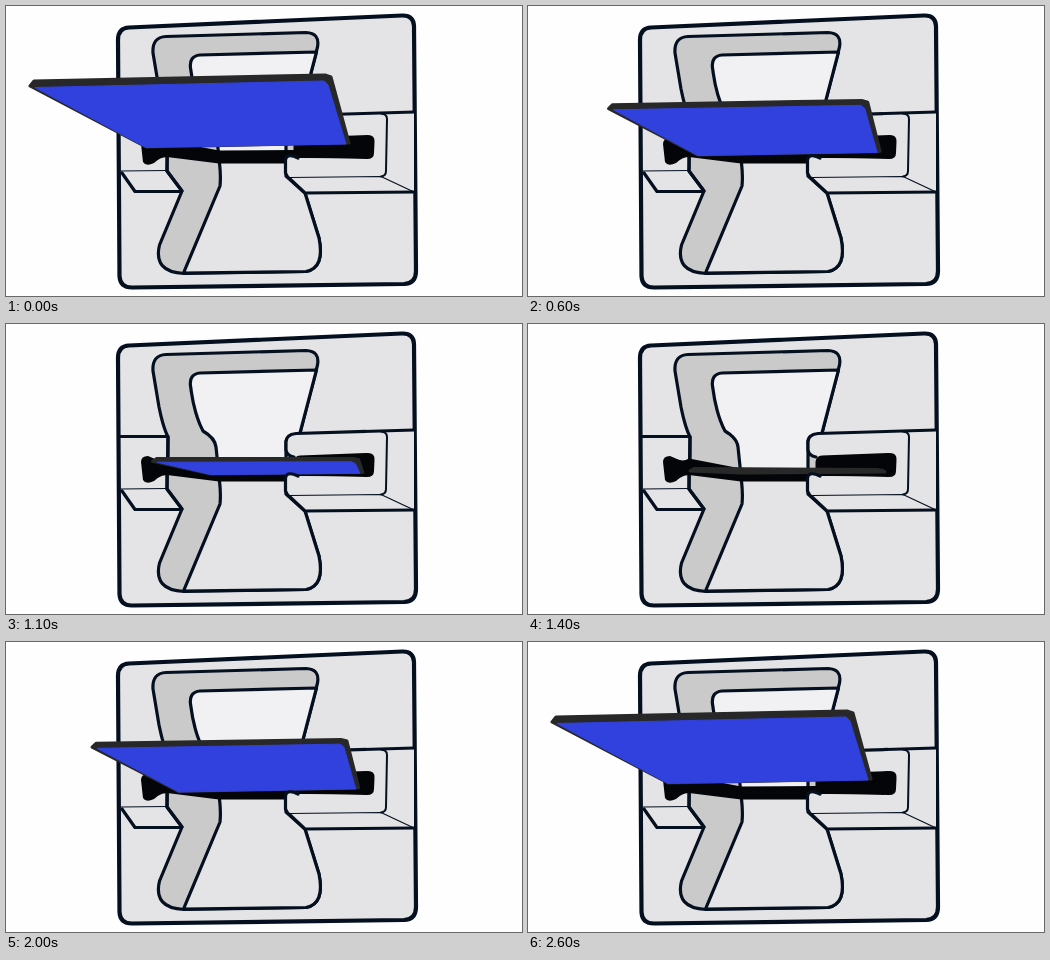
An HTML page for the animation above (2.7 s loop, 516 by 290 pixels).

```html
<!DOCTYPE html>
<html lang="en">
<head>
<meta charset="utf-8">
<title>Folding panel</title>
<style>
  html, body { margin: 0; width: 100%; height: 100%; overflow: hidden; background: #fefdff; }
  svg { display: block; width: 516px; height: 290px; }
  .line { fill: none; stroke: #04101f; stroke-width: 3.2; stroke-linejoin: round; stroke-linecap: round; }
  .frame { stroke-width: 4.2; }
  .edge { stroke-width: 2; }
  .thin { stroke-width: 1.2; }
  .body { fill: #e4e3e5; }
  .wall { fill: #cbcacb; }
  .view { fill: url(#view); }
  .slot { fill: #030509; }
  #rim { fill: #282829; stroke: #282829; stroke-width: 3; stroke-linejoin: round; }
  #face { fill: #3141dd; stroke: #3141dd; stroke-linejoin: round; }
</style>
</head>
<body>
<svg viewBox="0 0 516 290">
  <defs>
    <linearGradient id="view" gradientUnits="userSpaceOnUse" x1="0" y1="0" x2="0" y2="290">
      <stop offset=".52" stop-color="#f1f0f3"/>
      <stop offset=".52" stop-color="#e4e3e5"/>
    </linearGradient>
  </defs>

  <!-- housing -->
  <path class="line frame body" d="M112 34Q112 22 123 21.5L396 9.5Q407.5 9 408 20L410 265Q410 277.5 398 278L126 281.5Q114 281.5 113.5 270Z"/>

  <!-- opening and its inner wall -->
  <path class="line wall" d="M147 47Q146 31 160 30.5L300 26.5Q314 27 311.5 41L294 109L299 187L313 232Q319 262 300 265.5L178 267.5Q147 266 153.5 239L176 185L161 165L162 113Q157 103 153 83Z"/>
  <path class="line view" d="M310.5 46L194 49Q183 50 184.5 62Q188 90 197 107Q209 114 210 123L213.5 157Q215 170 214 180L177.5 267L300 265.5Q319 262 313 232L299 187L280 170V117L294 109Z"/>

  <!-- left bracket -->
  <path class="line" d="M114 112.5H162V136M161 151V165L176 185M116 167L129 185.5H174"/>
  <path class="line thin" d="M115 165L161 164.5"/>

  <!-- right bracket, upper part -->
  <path class="body" d="M408 106L290 109.5Q280 110.5 280 118V126Q281 132 288 133V165L299 187L408 186Z"/>
  <path class="line" d="M408 106L290 109.5Q280 110.5 280 118V126Q281 132 288 133"/>
  <path class="line edge" d="M375 107.5Q381 108 381 113L380 165Q380 170 375 170.5"/>

  <!-- slots and rod -->
  <path class="slot" d="M135 138Q135 132 142 132L149 135Q155 138 161 134.5L213 144.5L290 144V157.5L213 157.5L161 151Q154 151 148 157Q140 161 137 156Z"/>
  <path class="slot" d="M294 131.5L362 129Q369 129 368.5 136L368 147Q368 153 361 153L292 152Q287 152 287.5 146V138Q288 132 294 131.5Z"/>

  <polygon id="rim"/>
  <polygon id="face"/>

  <!-- right bracket, lower lip in front of the panel -->
  <path class="body" d="M361 153L292 152Q279 146 279.5 156V167L299 187L370 165Z"/>
  <path class="line" d="M292 152Q279 146 279.5 156V167Q281 171 284 173L299 187L408 186"/>
  <path class="line thin" d="M284 171.5L375 170.5L408 186"/>
</svg>

<script>
  const LOOP = 2700, STEP = 100;

  // Key moments: [time, fold], 0 is raised and 1 is edge-on
  const swing = [
    [0, 0], [400, .32], [600, .41], [800, .66], [1250, 1],
    [1400, 1], [1800, .61], [2200, .29], [2450, 0], [LOOP, 0]
  ];

  // Each corner travels on a shallow arc from raised to edge-on
  const corners = {
    tip:   { from: [24, 78],   to: [162, 146], bow: [0, -5] },
    heel:  { from: [325, 70],  to: [355, 146], bow: [2.5, -6] },
    toe:   { from: [343, 137], to: [357, 148], bow: [3.5, 4] },
    hinge: { from: [140, 141], to: [213, 149], bow: [0, 5] }
  };

  const rim = document.getElementById("rim");
  const face = document.getElementById("face");
  const mix = (a, b, k) => a + (b - a) * k;
  const shift = ([x, y], dx, dy) => [x + dx, y + dy];

  function foldAt(t) {
    const i = Math.max(1, swing.findIndex(([time]) => time >= t));
    const [t0, k0] = swing[i - 1], [t1, k1] = swing[i];
    return mix(k0, k1, (t - t0) / (t1 - t0));
  }

  function along({ from, to, bow }, k) {
    return from.map((v, i) => mix(v, to[i], k) + bow[i] * 4 * k * (1 - k));
  }

  function draw(t) {
    const k = foldAt(t);
    const thick = mix(1, .5, k);
    const [tip, heel, toe, hinge] = Object.values(corners).map(c => along(c, k));
    rim.setAttribute("points", [
      shift(tip, 0, 2 * thick), shift(tip, 4, -3 * thick),
      shift(heel, -6, -thick), shift(heel, 0, thick), toe, hinge
    ].join(" "));
    face.setAttribute("points", [
      shift(tip, 5, 3.5 * thick), shift(heel, -7, 5 * thick),
      shift(heel, -3, 9 * thick), shift(toe, -3, 1), shift(hinge, 0, .5)
    ].join(" "));
    face.style.visibility = k < 1 ? "visible" : "hidden";
  }

  const start = performance.now();
  function tick() {
    const t = (performance.now() - start) % LOOP;
    draw(Math.floor(t / STEP) * STEP);
    requestAnimationFrame(tick);
  }
  tick();
</script>
</body>
</html>
```
